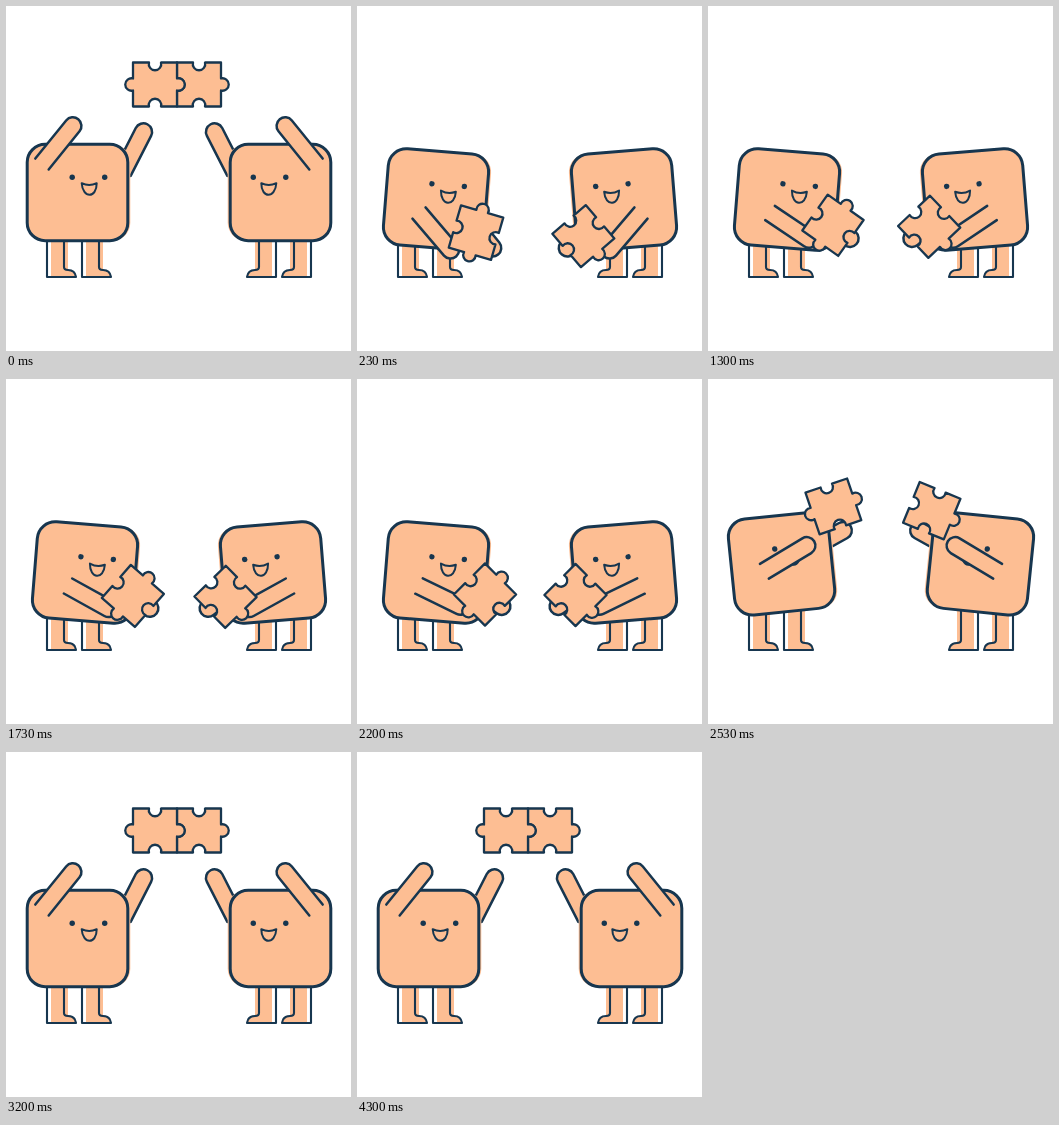
Recreate the animation shown at these times as an HTML page. Size 345 px wide and 345 px high, loop 5.06 s.

```html
<!DOCTYPE html>
<html lang="en">
<head>
<meta charset="utf-8">
<title>Two friends and a puzzle</title>
<style>
  html, body { margin: 0; width: 100%; height: 100%; overflow: hidden; background: #fff; }
  svg { display: block; width: 100vw; height: 100vh; }
  .line { fill: none; stroke: #17364f; stroke-linecap: round; stroke-linejoin: round; }
  .skin { fill: #fdbe93; }
  .both { fill: #fdbe93; stroke: #17364f; stroke-linejoin: round; stroke-linecap: round; }
  .dark { fill: #17364f; }
</style>
</head>
<body>
<svg id="stage" viewBox="0 0 345 345"></svg>
<script>
const LOOP = 5060;
const PICK_UP = 50, SWING = 2200, RELEASE = 2600, LEAN = 2800, JOINED = 3200;
const ARM_RADIUS = 8.6;
const stage = document.getElementById('stage');

function add(parent, tag, attrs = {}) {
  const el = document.createElementNS('http://www.w3.org/2000/svg', tag);
  for (const name in attrs) el.setAttribute(name, attrs[name]);
  return parent.appendChild(el);
}

const progress = (time, from, to) => Math.max(0, Math.min(1, (time - from) / (to - from)));
const smooth = u => u * u * (3 - 2 * u);
const lerp = (a, b, u) => a + (b - a) * u;
const mix = (a, b, u) => a.map((v, i) => lerp(v, b[i], u));
const drift = time => 1 - (1 - progress(time, PICK_UP, SWING)) ** 1.4;

// Body: x, y, angle. Arms: shoulder x, y, angle, length.
const poses = {
  start: { body: [79, 193.5, 4.6], near: [62, 207, 53, 49], far: [107, 208, 53, 45] },
  grip: { body: [79, 193.5, 4.6], near: [62, 207, 26, 46], far: [110, 202, 36, 43] },
  lean: { body: [63.5, 168.5, -25], near: [46, 165, -136, 56], far: [75, 118, -149, 43] },
  cheer: { body: [71.5, 186.5, 0], near: [36, 158, -51, 49], far: [117, 166, -63, 45] }
};

// Pieces: x, distance below the shared height, angle.
const leftPath = {
  start: [117.7, 0, -78], grip: [128, 0, -45], lean: [123.5, 0, 0], cheer: [149, 0, 0]
};
const rightPath = {
  start: [227.5, 4, 50], grip: [218.5, 0.5, 45], lean: [227.5, 7, 6], cheer: [193, 0, 0]
};

// Blends the four stages: a slow drift, a swing back, a return.
function blend(stages, time, swing, back) {
  if (time < SWING) return mix(stages.start, stages.grip, drift(time));
  if (time < LEAN) return mix(stages.grip, stages.lean, swing(progress(time, SWING, LEAN)));
  return mix(stages.lean, stages.cheer, back(progress(time, LEAN, JOINED)));
}

function poseAt(part, time) {
  const stages = Object.fromEntries(Object.entries(poses).map(([k, p]) => [k, p[part]]));
  return blend(stages, time, u => smooth(u ** 1.7), smooth);
}

// Height of the pieces: carried, then thrown along a parabola.
function pieceHeight(time) {
  const thrown = t => 42 + 36.5 * ((t - 2944) / (JOINED - 2944)) ** 2;
  if (time < SWING) return lerp(228.2, 215.5, drift(time));
  if (time < RELEASE) return lerp(215.5, thrown(RELEASE), progress(time, SWING, RELEASE) ** 1.5);
  return thrown(time);
}

// Sides clockwise from the top: 1 is a tab, -1 a notch.
function piecePath(sides) {
  const half = 22, neck = 6, r = 6.2;
  const corners = [[-1, -1], [1, -1], [1, 1], [-1, 1]];
  const steps = [[1, 0], [0, 1], [-1, 0], [0, -1]];
  let d = `M${-half} ${-half}`;
  sides.forEach((side, i) => {
    const [x, y] = corners[i].map(v => v * half);
    const [dx, dy] = steps[i];
    const at = s => `${x + dx * s} ${y + dy * s}`;
    d += `L${at(half - neck)}A${r} ${r} 0 1 ${side > 0 ? 1 : 0} ${at(half + neck)}L${at(2 * half)}`;
  });
  return d + 'Z';
}

function makeFriend(mirrored) {
  const root = add(stage, 'g', mirrored ? { transform: 'translate(346 0) scale(-1 1)' } : {});
  const leg = (x, foot) =>
    `M${x} 202V271H${x + foot}Q${x + foot - 1} 264 ${x + foot - 8} 264Q${x + 17} 264 ${x + 17} 261V202`;
  const legs = foot => leg(41, foot) + leg(76, foot);
  add(root, 'path', { class: 'skin', d: legs(25), transform: 'translate(4 0)' });
  add(root, 'path', { class: 'line', d: legs(29), 'stroke-width': 2.1 });

  const arm = () => add(root, 'path', { class: 'both', 'stroke-width': 2.5 });
  const box = { x: -50.3, y: -48.2, width: 100.6, height: 96.4, rx: 18 };
  const far = arm();
  const shade = add(root, 'rect', { class: 'skin', ...box });
  const body = add(root, 'g');
  add(body, 'rect', { class: 'both', 'stroke-width': 3, ...box });
  const face = add(body, 'g', { transform: 'translate(0.7 0.7)' });
  for (const x of [-6, 26.5]) add(face, 'circle', { class: 'dark', cx: x, cy: -16, r: 2.7 });
  add(face, 'path', {
    class: 'line', 'stroke-width': 2,
    d: 'M3.5 -10Q11 -6.5 18.5 -10C18.5 5.5 4.5 5.5 3.5 -10Z'
  });
  return { shade, body, near: arm(), far };
}

function place(el, x, y, angle) {
  el.setAttribute('transform', `translate(${x} ${y}) rotate(${angle})`);
}

function placeArm(el, [x, y, angle, length]) {
  const r = ARM_RADIUS;
  el.setAttribute('d', `M0 ${-r}H${length}A${r} ${r} 0 0 1 ${length} ${r}H0`);
  place(el, x, y, angle);
}

function placePiece(el, path, time) {
  const [x, below, angle] = blend(path, time, u => u, u => u ** 1.3);
  place(el, x, pieceHeight(time) + below, angle);
}

const friends = [makeFriend(false), makeFriend(true)];
const makePiece = sides => add(stage, 'path', {
  class: 'both', 'stroke-width': 2.3, d: piecePath(sides)
});
const rightPiece = makePiece([-1, 1, -1, -1]);
const leftPiece = makePiece([-1, 1, -1, 1]);

function draw(ms) {
  // Twenty pictures a second, held alternately for 30 and 70 ms.
  const step = Math.floor(ms / 100) * 2 + (ms % 100 >= 30 ? 1 : 0);
  const time = step === 0 ? JOINED : Math.min(step * 50, JOINED);
  const [x, y, angle] = poseAt('body', time);
  const near = poseAt('near', time), far = poseAt('far', time);

  for (const friend of friends) {
    place(friend.body, x, y, angle);
    place(friend.shade, x + 2.5, y, angle);
    placeArm(friend.near, near);
    placeArm(friend.far, far);
  }
  placePiece(leftPiece, leftPath, time);
  placePiece(rightPiece, rightPath, time);
}

const start = performance.now();
function tick() {
  draw((performance.now() - start) % LOOP);
  requestAnimationFrame(tick);
}
tick();
</script>
</body>
</html>
```
